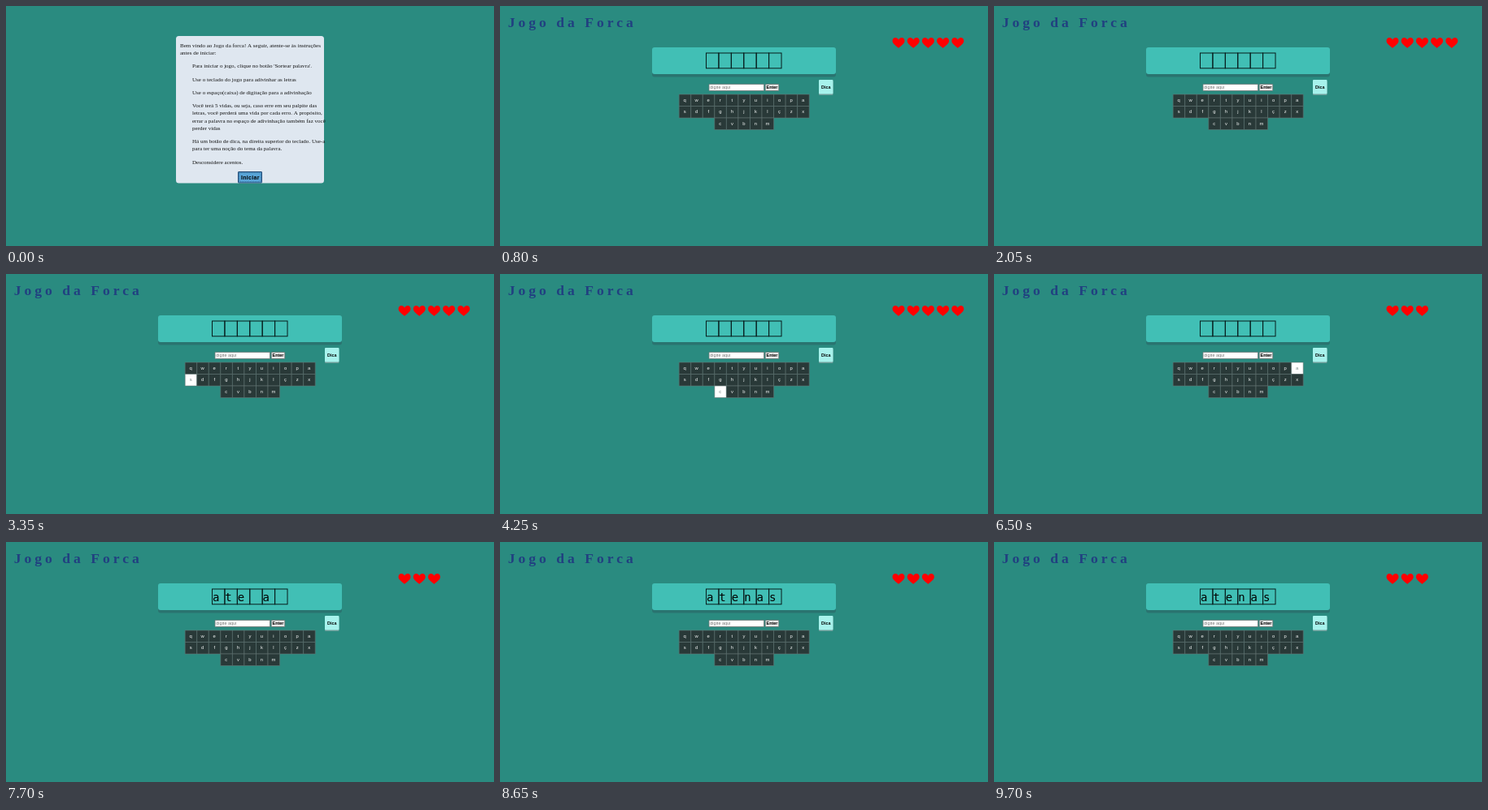
Animation of 600x296 px, one loop 9.75 s. Source, as an HTML page with a canvas:

```html
<!DOCTYPE html>
<html lang="pt">
<head>
<meta charset="utf-8">
<title>Jogo da Forca</title>
<style>
html, body { margin: 0; width: 100%; height: 100%; overflow: hidden; background: #2a8b80; }
canvas { display: block; width: 600px; height: 296px; }
</style>
</head>
<body>
<canvas id="stage"></canvas>
<script>
const LOOP = 9750;
const SERIF = '"Liberation Serif", serif';
const SANS = '"Liberation Sans", sans-serif';
const MONO = '"DejaVu Sans Mono", monospace';
const canvas = document.getElementById('stage');
const ctx = canvas.getContext('2d');
const ratio = window.devicePixelRatio || 1;
canvas.width = 600 * ratio;
canvas.height = 296 * ratio;

const START = 50;
const DRAW_WORD = 600;
const WORD = 'atenas';
const ROWS = ['qwertyuiopa', 'sdfghjklçzx', 'cvbnm'];
const REVEAL = { a: 6600, t: 7050, e: 7500, n: 8050, s: 8450 };
const LOST = [4600, 5550];

// Key under the pointer from each time on
const HOVER = [
  [0, ''], [250, 'b'], [300, 'h'], [350, 'y'], [400, ''],
  [2650, 'n'], [2700, 'b'], [3050, 'c'], [3100, 'f'], [3200, 'd'], [3250, 's'],
  [3750, 'd'], [4000, 'f'], [4250, 'c'],
  [5000, 'g'], [5300, 'f'], [5400, 'd'],
  [6250, 'f'], [6300, 'h'], [6350, 'k'], [6400, 'ç'], [6450, 'x'], [6500, 'a'],
  [6700, 'p'], [6750, 'i'], [6800, 'y'], [6850, 't'],
  [7100, 'r'], [7150, 'e'], [7550, 'f'], [7600, 'c'], [7650, 'v'], [7700, ''],
  [7900, 'n'], [8100, 'c'], [8150, 'f'], [8200, 'd'], [8250, 's'], [8650, '']
];

const INTRO = [
  [214, 48.2, 'Bem vindo ao Jogo da forca! A seguir, atente-se às instruções'],
  [214, 57.4, 'antes de iniciar:'],
  [229, 73.9, "Para iniciar o jogo, clique no botão 'Sortear palavra'."],
  [229, 90.2, 'Use o teclado do jogo para adivinhar as letras'],
  [229, 106.6, 'Use o espaço(caixa) de digitação para a adivinhação'],
  [229, 122.9, 'Você terá 5 vidas, ou seja, caso erre em seu palpite das'],
  [229, 132, 'letras, você perderá uma vida por cada erro. A propósito,'],
  [229, 141.2, 'errar a palavra no espaço de adivinhação também faz você'],
  [229, 150.4, 'perder vidas'],
  [229, 166.7, 'Há um botão de dica, na direita superior do teclado. Use-a'],
  [229, 175.9, 'para ter uma noção do tema da palavra.'],
  [229, 192.2, 'Desconsidere acentos.']
];

function box(x, y, w, h, fill, radius = 0, line) {
  ctx.beginPath();
  ctx.roundRect(x, y, w, h, radius);
  ctx.fillStyle = fill;
  ctx.fill();
  if (line) {
    ctx.strokeStyle = line;
    ctx.stroke();
  }
}

function text(str, x, y, font, color, align = 'left', spacing = 0) {
  ctx.font = font;
  ctx.fillStyle = color;
  ctx.textAlign = align;
  ctx.letterSpacing = spacing + 'px';
  ctx.fillText(str, x, y);
}

function drawIntro() {
  box(209, 37, 182, 181.5, '#dfe7f0', 3.5);
  for (const [x, mid, line] of INTRO) text(line, x, mid + 2.3, '7.03px ' + SERIF, '#151515');
  ctx.lineWidth = 1;
  box(285.5, 204.5, 29, 13.5, '#59a5d8', 0.5, '#244d78');
  ctx.lineWidth = 0.6;
  ctx.setLineDash([1, 1]);
  ctx.strokeStyle = '#173a5c';
  ctx.strokeRect(286.7, 205.7, 26.6, 11.1);
  ctx.setLineDash([]);
  text('Iniciar', 289, 214.2, 'bold 7px ' + SANS, '#000', 'left', 0.3);
}

function drawHeart(x, y) {
  ctx.beginPath();
  ctx.moveTo(x, y + 13);
  ctx.bezierCurveTo(x - 2, y + 10.6, x - 7.5, y + 8, x - 7.5, y + 4);
  ctx.bezierCurveTo(x - 7.5, y - 0.8, x - 1.6, y - 1.2, x, y + 2.7);
  ctx.bezierCurveTo(x + 1.6, y - 1.2, x + 7.5, y - 0.8, x + 7.5, y + 4);
  ctx.bezierCurveTo(x + 7.5, y + 8, x + 2, y + 10.6, x, y + 13);
  ctx.fillStyle = '#ff0000';
  ctx.fill();
}

function drawWord(t) {
  box(187, 54, 226, 33.5, '#2a7470', 3);
  box(187, 51, 226, 33, '#41bfb5', 3);
  if (t < DRAW_WORD) return;
  const pitch = 15.42;
  ctx.strokeStyle = '#071c1b';
  ctx.lineWidth = 1;
  [...WORD].forEach((ch, i) => {
    const x = 253.5 + i * pitch;
    ctx.strokeRect(x, 58, pitch, 18.8);
    if (t >= REVEAL[ch]) text(ch, x + 0.4, 72.8, '14px ' + MONO, '#000');
  });
}

function drawForm() {
  ctx.lineWidth = 0.8;
  box(257, 96.4, 67.5, 8.1, '#fff', 0.5, '#6c7775');
  text('digite aqui', 258.3, 102.2, '5.5px ' + SANS, '#757575');
  box(326.2, 96.4, 16.6, 8.1, '#e9e9e9', 0.8, '#69706f');
  text('Enter', 334.5, 102.3, 'bold 5.4px ' + SANS, '#000', 'center');
  box(392, 92.5, 17.5, 17.5, '#6a9c98', 1);
  box(392, 91, 17.5, 17.5, '#a7f2ec', 1);
  text('Dica', 400.7, 101.9, 'bold 5.4px ' + SANS, '#000', 'center');
}

function drawKeys(t) {
  const active = HOVER.findLast(([from]) => t >= from)[1];
  const size = 14.55;
  ctx.lineWidth = 0.6;
  ROWS.forEach((row, r) => {
    const left = 300.2 - row.length * size / 2;
    [...row].forEach((ch, i) => {
      const on = ch === active;
      const x = left + i * size;
      const y = 109 + r * 14.5;
      box(x, y, size, 14.5, on ? '#fff' : '#293938', 0, '#637572');
      text(ch, x + size / 2 - 0.3, y + 8.7, '5.9px ' + SANS, on ? '#778885' : '#f2f5f4', 'center');
    });
  });
}

function drawGame(t) {
  text('Jogo da Forca', 9.7, 26.3, 'bold 17.6px ' + SERIF, '#214080', 'left', 4);
  const lives = 5 - LOST.filter(time => t >= time).length;
  for (let i = 0; i < lives; i++) drawHeart(490 + i * 18.2, 39);
  drawWord(t);
  drawForm();
  drawKeys(t);
}

function frame(now) {
  const t = now % LOOP;
  ctx.setTransform(ratio, 0, 0, ratio, 0, 0);
  ctx.fillStyle = '#2a8b80';
  ctx.fillRect(0, 0, 600, 296);
  if (t < START) drawIntro();
  else drawGame(t);
  requestAnimationFrame(frame);
}

const origin = performance.now();
requestAnimationFrame(() => {
  const tick = () => frame(performance.now() - origin);
  tick();
});
</script>
</body>
</html>
```
